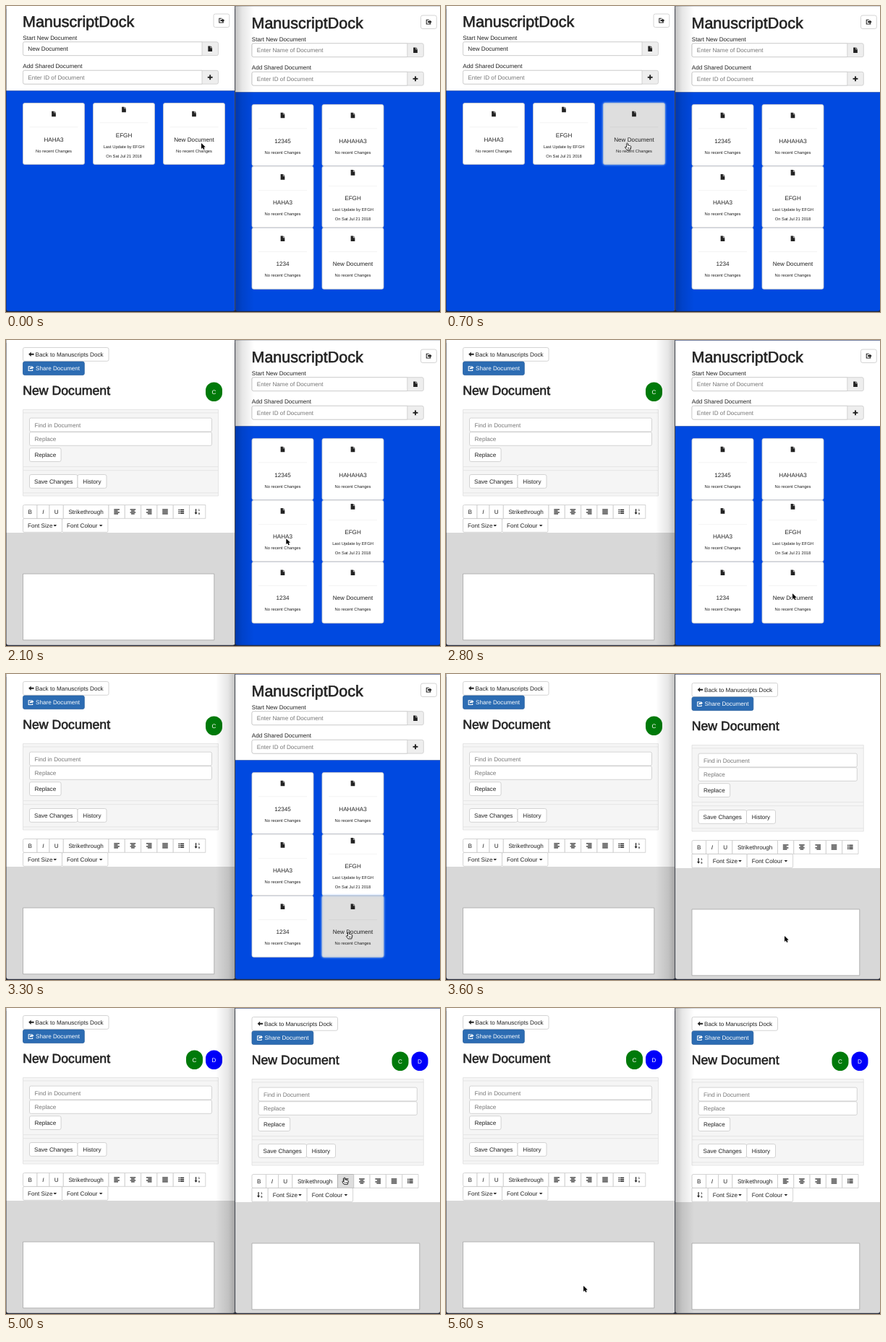
Animation, 600 px wide and 424 px high, one loop 5700 ms. Source, as an HTML page with a canvas:

```html
<!DOCTYPE html>
<html lang="en">
<head>
<meta charset="utf-8">
<title>Shared document editor</title>
<style>
html, body { margin: 0; width: 600px; height: 424px; overflow: hidden; background: #fff; }
canvas { display: block; width: 600px; height: 424px; }
</style>
</head>
<body>
<canvas id="stage"></canvas>
<script>
const W = 600, H = 424, LOOP = 5700, STEP = 100;
const FONT = '"Liberation Sans", Arial, sans-serif';
const INK = '#222', BLUE = '#0049e0', BORDER = '#c9c9c9';
const BODY = 8.15, SMALL = 5.8;
const APP = 'ManuscriptDock', SHARED = 'EFGH';

const canvas = document.getElementById('stage');
const ratio = window.devicePixelRatio || 1;
canvas.width = W * ratio;
canvas.height = H * ratio;
const ctx = canvas.getContext('2d');
ctx.scale(ratio, ratio);
if ('textRendering' in ctx) ctx.textRendering = 'geometricPrecision';

// Mouse path: time, x, y of the tip
const PATH = [
  [0, 270, 190], [200, 268, 191], [500, 250.5, 190], [1500, 251, 190],
  [2000, 372, 262], [2400, 470, 346], [2600, 479, 351], [3100, 479, 352],
  [3500, 468, 363], [4000, 468, 363], [4700, 468, 236], [5000, 468, 235],
  [5400, 198, 378], [5500, 190, 385], [5700, 190, 385]
];

function mouseAt(t) {
  const i = Math.max(1, PATH.findIndex(p => p[0] > t));
  const [t0, x0, y0] = PATH[i - 1], [t1, x1, y1] = PATH[i];
  const k = (t - t0) / (t1 - t0), e = k * k * (3 - 2 * k);
  return [x0 + (x1 - x0) * e, y0 + (y1 - y0) * e];
}

const within = (t, a, b) => t >= a && t < b;

function rect(x, y, w, h, fill) {
  ctx.fillStyle = fill;
  ctx.fillRect(x, y, w, h);
}

function box(x, y, w, h, r, fill, stroke) {
  ctx.beginPath();
  ctx.roundRect(x, y, w, h, r);
  ctx.fillStyle = fill;
  ctx.fill();
  if (stroke) {
    ctx.strokeStyle = stroke;
    ctx.lineWidth = 0.8;
    ctx.stroke();
  }
}

function text(s, x, y, size = BODY, color = INK, align = 'left', style = '') {
  ctx.font = `${style} ${size}px ${FONT}`;
  ctx.fillStyle = color;
  ctx.textAlign = align;
  ctx.fillText(s, x, y);
}

function heading(s, x, y, size) {
  text(s, x, y, size);
  ctx.strokeStyle = INK;
  ctx.lineWidth = 0.6;
  ctx.strokeText(s, x, y);
}

function poly(points, fill, stroke, width = 1) {
  ctx.beginPath();
  for (let i = 0; i < points.length; i += 2) ctx.lineTo(points[i], points[i + 1]);
  ctx.closePath();
  if (stroke) {
    ctx.strokeStyle = stroke;
    ctx.lineWidth = width;
    ctx.stroke();
  }
  ctx.fillStyle = fill;
  ctx.fill();
}

function at(x, y, draw, scale = 1) {
  ctx.save();
  ctx.translate(x, y);
  ctx.scale(scale, scale);
  draw();
  ctx.restore();
}

// Open tray used by the log-out and share icons
function tray(color) {
  ctx.strokeStyle = color;
  ctx.lineWidth = 1.1;
  ctx.beginPath();
  ctx.moveTo(0.2, -3);
  ctx.lineTo(-3.4, -3);
  ctx.lineTo(-3.4, 3.2);
  ctx.lineTo(2.4, 3.2);
  ctx.lineTo(2.4, 1.6);
  ctx.stroke();
}

const icons = {
  file() {
    poly([-3, -4, 0.4, -4, 0.4, -1.2, 3, -1.2, 3, 4, -3, 4], INK);
    poly([1, -4, 3, -1.8, 1, -1.8], INK);
  },
  plus() {
    rect(-3.6, -1, 7.2, 2, INK);
    rect(-1, -3.6, 2, 7.2, INK);
  },
  exit() {
    tray(INK);
    poly([-1.6, -1, 1, -1, 1, -3, 4.4, 0, 1, 3, 1, 1, -1.6, 1], INK);
  },
  share() {
    tray('#fff');
    poly([-1.8, 1.6, -1.2, -1.2, 1, -2.2, 1, -4, 4.4, -1.2, 1, 1.4, 1, -0.2], '#fff');
  },
  back() {
    poly([-4, 0, -0.4, -3.4, -0.4, -1.1, 3.8, -1.1, 3.8, 1.1, -0.4, 1.1, -0.4, 3.4], INK);
  },
  left() { lines([0, 0, 0, 0], [8, 5.5, 8, 6]); },
  center() { lines([0, 1.5, 0, 1.5], [8, 5, 8, 5]); },
  right() { lines([0, 2.5, 0, 2], [8, 5.5, 8, 6]); },
  justify() { lines([0, 0, 0, 0], [8, 8, 8, 8]); },
  list() {
    for (let y = -3.4; y < 3; y += 2.5) {
      rect(-4, y, 1.6, 1.5, INK);
      rect(-1.6, y, 5.6, 1.5, INK);
    }
  },
  sort() {
    rect(-2.8, -4, 1.3, 6, INK);
    poly([-4.2, 1.2, -0.1, 1.2, -2.15, 4], INK);
    text('1', 2.4, -0.6, 4.2, INK, 'center', 'bold');
    text('9', 2.4, 4, 4.2, INK, 'center', 'bold');
  }
};

function lines(starts, widths) {
  starts.forEach((s, i) => rect(s - 4, i * 2.1 - 3.8, widths[i], 1.25, INK));
}

const icon = (name, x, y) => at(x, y, icons[name], 0.95);

function field(x, y, w, h, s, color = '#777') {
  box(x, y, w, h, 2, '#fff', BORDER);
  text(s, x + 7, y + 12.4, BODY, color);
}

function button(x, y, w, s, fill = '#fff') {
  box(x, y, w, 18.8, 2.3, fill, BORDER);
  if (s) text(s, x + w / 2, y + 12.3, BODY, INK, 'center');
}

function inputGroup(y, w, label, value, color, glyph) {
  text(label, 23.3, y - 3);
  box(23.5, y, w, 18.8, 2.3, '#eee', BORDER);
  box(23.5, y, w - 22.5, 18.8, [2.3, 0, 0, 2.3], '#fff', BORDER);
  text(value, 30.3, y + 12.4, BODY, color);
  icon(glyph, 12.2 + w, y + 9.5);
}

function card(x, y, name, state) {
  const cx = x + 42.5, shared = name === SHARED, dy = shared ? -6 : 0;
  ctx.save();
  if (state === 'pressed') {
    ctx.shadowColor = '#a5cbff';
    ctx.shadowBlur = 3 * ratio;
  }
  box(x, y, 85, 85, 2.5, state ? '#dedede' : '#fff', state ? '#b4bdca' : BORDER);
  ctx.restore();
  icon('file', cx, y + 15 + dy);
  rect(x + 9, y + 33 + dy, 67, 0.7, state ? '#d2d2d2' : '#eee');
  text(name, cx, y + 53 + dy, BODY, INK, 'center');
  const notes = shared ? ['Last Update by ' + SHARED, 'On Sat Jul 21 2018'] : ['No recent Changes'];
  notes.forEach((s, i) => text(s, cx, y + 68 + dy + i * 13.4, SMALL, INK, 'center'));
}

function portal(width, inner, draft, names, columns, step, state) {
  rect(0, 0, width, 118, '#fff');
  rect(0, 118, width, 306, BLUE);
  heading(APP, 23, 29.6, 21.5);
  box(width - 29, 11.5, 21.8, 18.5, 2.5, '#fff', BORDER);
  icon('exit', width - 18, 20.5);
  inputGroup(50.3, inner, 'Start New Document', draft || 'Enter Name of Document', draft ? INK : '#777', 'file');
  inputGroup(89.8, inner, 'Add Shared Document', 'Enter ID of Document', '#777', 'plus');
  names.forEach((name, i) => {
    const last = i === names.length - 1;
    card(23.5 + (i % columns) * 97, 135 + Math.floor(i / columns) * step, name, last && state);
  });
}

function avatar(x, letter, color) {
  box(x, 59, 23, 26.6, 11.5, color);
  text(letter, x + 11.5, 75.2, BODY, '#fff', 'center');
}

function dropdown(x, y, w, s) {
  box(x, y, w, 18.8, 1.5, '#fff', BORDER);
  text(s, x + 6.6, y + 12.3);
  poly([x + w - 12, y + 8.6, x + w - 7.4, y + 8.6, x + w - 9.7, y + 11], INK);
}

function toolbar(wrapped, hover) {
  const top = 229, low = 248;
  box(23.5, top, 19.5, 18.8, [2, 0, 0, 2], '#fff', BORDER);
  box(43, top, 17, 18.8, 0, '#fff', BORDER);
  box(60, top, 19.3, 18.8, 0, '#fff', BORDER);
  text('B', 33.2, 241.3, BODY, INK, 'center');
  text('I', 51.4, 241.3, BODY, INK, 'center', 'italic');
  text('U', 69.6, 241.3, BODY, INK, 'center');
  box(79.3, top, 62.7, 18.8, 0, '#fff', BORDER);
  text('Strikethrough', 110.6, 241.3, BODY, INK, 'center');
  ['left', 'center', 'right', 'justify', 'list', 'sort'].forEach((name, i) => {
    const wrap = wrapped && name === 'sort';
    const x = wrap ? 23.5 : 142 + i * 22.3, y = wrap ? low : top;
    const lit = hover && i === 0;
    box(x, y, 22.3, 18.8, 0, lit ? '#dedede' : '#fff', lit ? '#a8a8a8' : BORDER);
    icon(name, x + 11.1, y + 9.4);
  });
  const x = wrapped ? 45.7 : 23.5;
  dropdown(x, low, 54, 'Font Size');
  dropdown(x + 54, low, 63.4, 'Font Colour');
}

function editor(width, inner, docWidth, users, wrapped, hover) {
  rect(0, 0, width, 267.5, '#fff');
  rect(0, 267.5, width, 157, '#d8d8d8');
  button(23.5, 11, 118.5);
  icon('back', 35, 20.3);
  text('Back to Manuscripts Dock', 40.6, 23.3);
  box(23.5, 30.5, 84.8, 18.6, 2.3, '#2c6cb3', '#285f9e');
  icon('share', 34.4, 40);
  text('Share Document', 41, 42.9, BODY, '#fff');
  heading('New Document', 23.2, 76.6, 17.7);

  const right = width - 17;
  if (users > 1) {
    avatar(right - 50, 'C', '#007a0a');
    avatar(right - 23, 'D', '#0000fa');
  } else if (users) {
    avatar(right - 23, 'C', '#007a0a');
  }

  box(23.5, 97, inner, 119.5, 0, '#f5f5f5', '#e0e0e0');
  [101, 175.8, 180.8, 212].forEach(y => rect(23.5, y, inner, 0.8, '#e2e2e2'));
  field(32.5, 108.6, inner - 18, 18.8, 'Find in Document');
  field(32.5, 128.2, inner - 18, 18.6, 'Replace');
  button(32.5, 150.2, 43.6, 'Replace');
  button(32.5, 187, 66.5, 'Save Changes');
  button(99, 187, 40, 'History');
  toolbar(wrapped, hover);
  box(23.5, 324.5, docWidth, 91.8, 0, '#fff', '#a4a4a4');
}

// A window clipped to its frame; dx, dy place the page inside it
function pane(x, y, w, dx, dy, draw) {
  ctx.save();
  ctx.beginPath();
  ctx.roundRect(x, y, w, 422.8 - y, [0, 0, 3, 3]);
  ctx.clip();
  rect(x, y, w, 4, '#fff');
  ctx.translate(dx, dy);
  draw();
  ctx.restore();
}

function shade(from, to) {
  const g = ctx.createLinearGradient(from, 0, to, 0);
  g.addColorStop(0, 'rgba(0,0,0,.24)');
  g.addColorStop(0.35, 'rgba(0,0,0,.1)');
  g.addColorStop(1, 'rgba(0,0,0,0)');
  rect(Math.min(from, to), 0, Math.abs(to - from), 422.8, g);
}

function arrow() {
  poly([0, 0, 0, 8.6, 2, 6.8, 3.4, 9.8, 5, 9, 3.7, 6.2, 6.2, 6], '#000', '#fff', 1.2);
}

function hand() {
  ctx.beginPath();
  ctx.moveTo(-1, 0.6);
  ctx.quadraticCurveTo(0, -0.8, 1, 0.6);
  ctx.lineTo(1.2, 3.4);
  ctx.quadraticCurveTo(2.4, 2.7, 3, 3.8);
  ctx.quadraticCurveTo(4.2, 3.2, 4.6, 4.4);
  ctx.quadraticCurveTo(6, 4.2, 5.8, 6);
  ctx.lineTo(4.6, 10.2);
  ctx.lineTo(-0.6, 10.2);
  ctx.lineTo(-3.4, 6.4);
  ctx.quadraticCurveTo(-3.4, 4.8, -1, 6.2);
  ctx.closePath();
  ctx.fillStyle = '#fff';
  ctx.fill();
  ctx.strokeStyle = '#000';
  ctx.lineWidth = 0.9;
  ctx.stroke();
  for (let i = 0; i < 3; i++) rect(0.4 + i * 1.6, 6.4, 0.6, 2.2, '#000');
}

function draw(t) {
  const rightActive = within(t, 2600, 5500);
  const users = t < 1900 ? 0 : t < 4300 ? 1 : 2;
  const onTool = within(t, 4700, 5100);
  const press = (from, click, end) => within(t, click, end) ? 'pressed' : within(t, from, click) ? 'hover' : '';

  rect(0, 0, W, H, '#262a38');
  pane(0.5, 0, 316, 0, -0.5, () => {
    if (t < 1000) portal(316, 270, 'New Document', ['HAHA3', SHARED, 'New Document'], 3, 85, press(200, 600, 1000));
    else editor(316, 270, 264.3, users, false, false);
  });
  pane(317, 0, 283, 316.5, 1.5, () => {
    if (t < 3400) portal(286, 237.3, '', ['12345', 'HAHAHA3', 'HAHA3', SHARED, '1234', 'New Document'], 2, 85.4, press(3000, 3200, 3400));
    else editor(284, 237.3, 231.8, t < 4300 ? 0 : 2, true, onTool);
  });
  rect(317, 0, 283, 0.8, rightActive ? '#53628c' : '#c4c6cc');

  if (rightActive) shade(316.5, 290);
  else shade(317, 343);
  rect(316.3, 0, 0.8, 422, '#55585f');

  const [x, y] = mouseAt(t);
  const pointing = within(t, 200, 1000) || within(t, 3000, 3400) || onTool;
  at(x, y, pointing ? hand : arrow, 0.92);
}

function frame(now) {
  draw(Math.floor((now % LOOP) / STEP) * STEP);
  requestAnimationFrame(frame);
}
draw(0);
requestAnimationFrame(frame);
</script>
</body>
</html>
```
